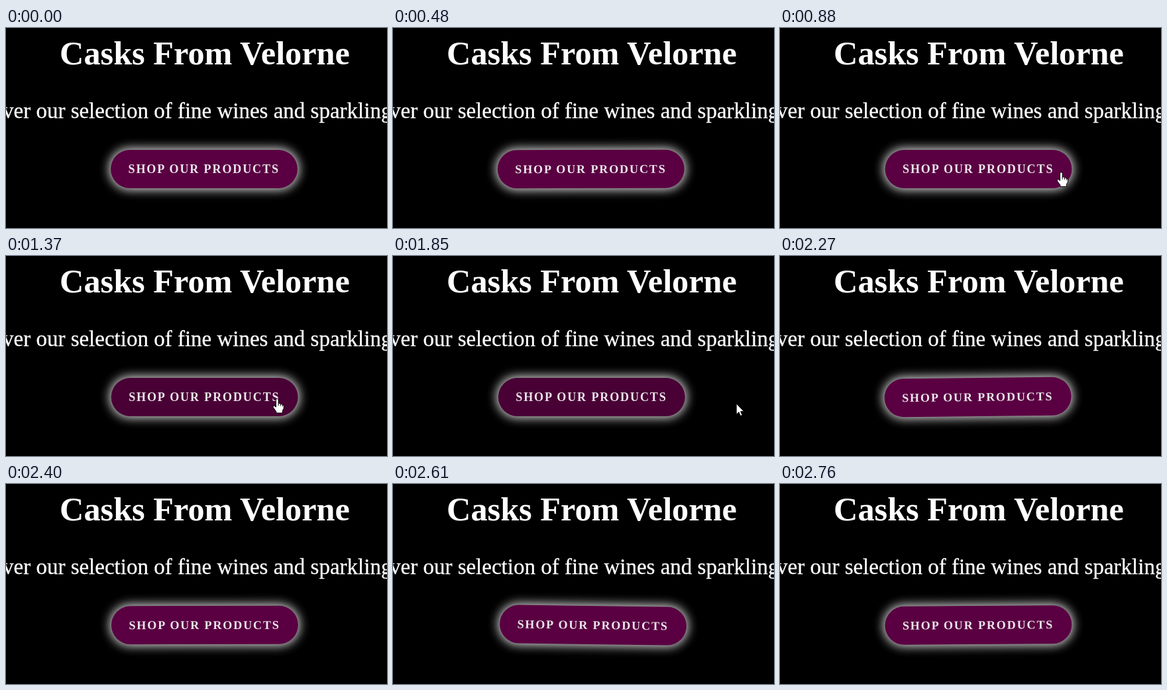
Write an HTML page that moves like this. It is 575 by 302 pixels and loops after 2830 ms.

```html
<!DOCTYPE html>
<html lang="en">
<head>
<meta charset="utf-8">
<title>Wine shop banner</title>
<style>
  html, body { margin: 0; width: 100%; height: 100%; overflow: hidden; background: #000; }
  svg { display: block; }
  text { font-family: "Liberation Serif", "Times New Roman", serif; fill: #fff; }
  .title { font-size: 50.3px; font-weight: bold; }
  .lead { font-size: 33px; stroke: #fff; stroke-width: .3px; }
  .label { font-size: 18px; font-weight: bold; letter-spacing: 1.9px; fill: #ece6ec; }
  #cursor path { fill: #fff; stroke: #000; stroke-width: 1; stroke-linejoin: round; }
</style>
</head>
<body>
<svg width="575" height="302" viewBox="0 0 575 302">
  <defs>
    <filter id="blur" x="-20%" y="-80%" width="140%" height="260%">
      <feGaussianBlur stdDeviation="8"/>
    </filter>
  </defs>
  <text class="title" x="300" y="55" text-anchor="middle">Casks From Velorne</text>
  <text class="lead" x="-5" y="136">ver our selection of fine wines and sparkling</text>
  <g id="button">
    <rect x="-143" y="-31" width="286" height="62" rx="31" fill="#fff" opacity=".9" filter="url(#blur)"/>
    <rect id="pill" x="-141" y="-29" width="282" height="58" rx="29"/>
    <text class="label" x="-114.5" y="6">SHOP OUR PRODUCTS</text>
  </g>
  <g id="cursor">
    <path id="arrow" d="M0 0V16.5L3.8 13L6.3 18.8L9 17.6L6.5 12H11.5Z"/>
    <g id="hand">
      <path d="M-1.8 1.5Q0 -1 1.8 1.5V7.6Q4 6.6 5 8.6Q7 7.8 8 9.8Q10 9.2 10 11.6V15L8 18.5V22H-1.5V19.8L-6 13.5Q-7 10.5 -4.5 11L-1.8 13Z"/>
      <path d="M1.8 7.6V11M5 8.6V11.5M8 9.8V12"/>
    </g>
  </g>
</svg>
<script>
const LOOP = 2830;
const byId = id => document.getElementById(id);

// Each key: time in ms, then values.
const pose = [ // x, y, degrees
  [0, 0, 0, 0], [210, .8, 0, .25], [420, -.5, 0, -.25], [630, .5, 0, .2], [880, .5, 0, 0],
  [1850, .8, 0, 0], [2060, -.4, 0, -.6], [2270, -.4, 0, -.6], [2610, 3, 0, .75],
  [2760, .4, 0, -.4], [LOOP, 0, 0, 0]
];
const pointer = [ // x, y
  [670, 510, 296], [750, 480, 262], [880, 424.5, 217.5], [1100, 406, 214], [1600, 412, 216],
  [1720, 432, 215], [1850, 518, 222.5], [2060, 548, 274.5], [2200, 539, 296]
];
const shade = [[880, 0], [1200, 1], [1850, 1], [2050, 0]];

function sample(keys, t) {
  if (t <= keys[0][0]) return keys[0].slice(1);
  const next = keys.findIndex(key => key[0] > t);
  if (next < 0) return keys[keys.length - 1].slice(1);
  const a = keys[next - 1], b = keys[next];
  const u = (t - a[0]) / (b[0] - a[0]);
  return a.slice(1).map((v, i) => v + (b[i + 1] - v) * u);
}

function overPill(x, y) {
  const dx = Math.max(Math.abs(x - 299) - 112, 0);
  return Math.hypot(dx, y - 213) < 29;
}

function draw(now) {
  const t = now % LOOP;

  const [x, y, angle] = sample(pose, t);
  byId("button").setAttribute("transform", `translate(${299 + x} ${213 + y}) rotate(${angle})`);
  const [dark] = sample(shade, t);
  byId("pill").setAttribute("fill", `rgb(${90 - 17 * dark},0,${66 - 13 * dark})`);

  const [px, py] = sample(pointer, t);
  const over = overPill(px, py);
  byId("cursor").setAttribute("transform", `translate(${px} ${py})`);
  byId("cursor").setAttribute("visibility", t >= 670 && t < 2270 ? "visible" : "hidden");
  byId("arrow").style.display = over ? "none" : "";
  byId("hand").style.display = over ? "" : "none";
}

const start = performance.now();
function tick() {
  draw(performance.now() - start);
  requestAnimationFrame(tick);
}
tick();
</script>
</body>
</html>
```
